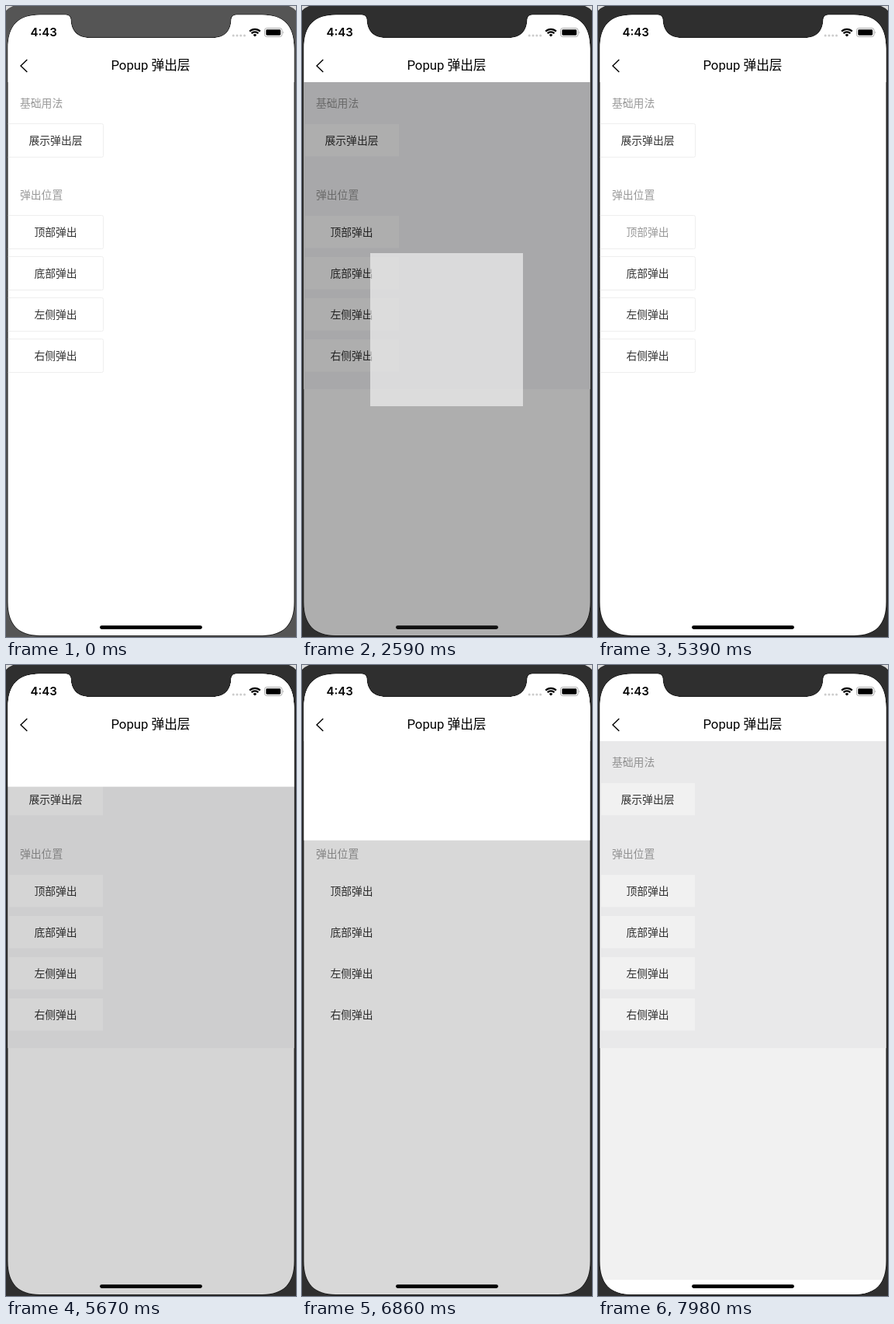
Animation, 374 px wide and 812 px high, one loop 8 s. Source, as an HTML page:

```html
<!DOCTYPE html>
<html lang="zh-CN">
<head>
<meta charset="utf-8">
<title>Popup</title>
<style>
  html, body { margin: 0; width: 100%; height: 100%; overflow: hidden; background: #fff; }
  svg { display: block; width: 374px; height: 812px; }
  text { font-family: Roboto, "Noto Sans CJK SC", "Noto Sans CJK", sans-serif; }
  .section { font-size: 13.8px; fill: #999; }
  .label { font-size: 13.8px; text-anchor: middle; }
</style>
</head>
<body>
<svg viewBox="0 0 374 812">
  <defs>
    <path id="shape" d="M2.5 55C2.5 25 16 11.5 44 11.5H77q6 0 6.5 6c.5 15 9 23.5 24 23.5H267c15 0 23-8.5 23.5-23.5q.5-6 6.5-6H330C358 11.5 371.5 25 371.5 55V767C371.5 796 358 810 330 810H44C16 810 2.5 796 2.5 767Z"/>
    <clipPath id="screen"><use href="#shape"/></clipPath>
  </defs>

  <rect id="bezel" width="374" height="812"/>
  <path d="M0 0H9Q4 2 0 6ZM374 0H365Q370 2 374 6Z" fill="#ddd"/>
  <use href="#shape" fill="#fff" stroke="#111" stroke-width="1.6"/>

  <g clip-path="url(#screen)">
    <rect x="2" y="11" width="370" height="800" fill="#fff"/>
    <rect id="tint" x="2" y="98" width="370" height="395" fill="#f6f6f8"/>
    <g id="buttons"></g>
    <text class="section" x="18" y="130">基础用法</text>
    <text class="section" x="18" y="248">弹出位置</text>
    <rect id="overlay" x="2" y="98" width="370" height="713"/>
    <rect id="popup" fill="#fff"/>

    <rect x="2" y="11" width="370" height="87" fill="#fff"/>
    <path d="M27.3 69L19 77L27.3 85" fill="none" stroke="#000" stroke-width="1.4"/>
    <text x="186.5" y="82" font-size="16.7" text-anchor="middle">Popup 弹出层</text>
    <text x="31.5" y="39.3" font-size="15" font-weight="600" style="font-family:Inter,sans-serif">4:43</text>

    <path d="M293.2 38H308" stroke="#ccc" stroke-width="3" stroke-linecap="round" stroke-dasharray="0 4.8"/>
    <g fill="none" stroke="#000" stroke-width="2.2">
      <path d="M314.2 32.6a9.6 9.6 0 0 1 13.6 0M316.6 35.3a6.2 6.2 0 0 1 8.8 0"/>
      <path d="M321 39.6l-2.3-2.4a3.3 3.3 0 0 1 4.6 0z" fill="#000" stroke="none"/>
    </g>
    <rect x="333.5" y="28.5" width="22.5" height="11" rx="2.8" fill="none" stroke="#aaa"/>
    <rect x="335.3" y="30.3" width="18.9" height="7.4" rx="1.4"/>
    <path d="M357.2 32.3q1.8 1.7 0 3.4z" fill="#aaa"/>
    <rect id="home" x="121" y="797.2" width="132" height="4.8" rx="2.4"/>
  </g>
</svg>
<script>
const LOOP = 8000, STEP = 70, DURATION = 300, SIZE = 197, DIM = 0.55;
const $ = id => document.getElementById(id);
const set = (el, attrs) => { for (const k in attrs) el.setAttribute(k, attrs[k]); };

const buttonInfo = [
  { y: 151.5, label: '展示弹出层', press: 2240 },
  { y: 269.5, label: '顶部弹出', press: 5390 },
  { y: 322.5, label: '底部弹出', press: 7770 },
  { y: 375.5, label: '左侧弹出' },
  { y: 428.5, label: '右侧弹出' }
];
$('buttons').innerHTML = buttonInfo.map(({ y, label }) => `
  <rect class="face" x="4" y="${y + 0.5}" width="121" height="41.5" fill="#fff"/>
  <path class="border" d="M2.5 ${y}H123.5q2 0 2 2v39q0 2-2 2H2.5" fill="none" stroke="#eee"/>
  <text class="label" x="64" y="${y + 26.8}">${label}</text>`).join('');
const labels = document.querySelectorAll('.label');
const borders = document.querySelectorAll('.border');

const popups = [
  { open: 2375, end: 3780, place: p => ({ x: 88, y: 318, width: SIZE, height: SIZE, opacity: p }) },
  { open: 5525, close: 6700, end: 7000, place: p => ({ x: 2, y: 98 - SIZE * (1 - p), width: 370, height: SIZE, opacity: 1 }) },
  { open: 7903, end: LOOP, place: p => ({ x: 2, y: 810.5 - SIZE * p, width: 370, height: SIZE + 2, opacity: 1 }) }
];

// cubic-bezier(.42, 0, 1, 1), solved by bisection
function easeIn(t) {
  if (t <= 0 || t >= 1) return t <= 0 ? 0 : 1;
  let low = 0, high = 1, u;
  for (let i = 0; i < 24; i++) {
    u = (low + high) / 2;
    const x = 1.26 * u * (1 - u) ** 2 + 3 * u * u * (1 - u) + u ** 3;
    if (x < t) low = u; else high = u;
  }
  return 3 * u * u * (1 - u) + u ** 3;
}

function draw(t) {
  set($('bezel'), { fill: t < 2240 ? '#555' : '#2f2f2f' });
  buttonInfo.forEach(({ press }, i) =>
    set(labels[i], { fill: t >= press && t < press + STEP ? '#999' : '#333' }));

  const active = popups.find(p => t >= p.open && t < p.end);
  let shade = 0, shown = 0, tinted = false;
  if (active) {
    const leaving = (t - active.close) / DURATION;
    if (leaving > 0) {
      shown = 1 - easeIn(leaving);
      shade = easeIn(1 - leaving);
      tinted = leaving < 0.2;
    } else {
      shown = shade = easeIn((t - active.open) / DURATION);
      tinted = true;
    }
    set($('popup'), active.place(shown));
  }
  set($('popup'), { visibility: active ? 'visible' : 'hidden' });
  set($('overlay'), { opacity: DIM * shade });
  set($('tint'), { opacity: tinted ? 1 : 0 });
  borders.forEach(b => set(b, { opacity: active ? 0 : 1 }));
  const grey = Math.round(51 * shade ** 2);
  set($('home'), { fill: `rgb(${grey},${grey},${grey})` });
}

function tick() {
  draw(Math.floor(performance.now() % LOOP / STEP) * STEP);
  requestAnimationFrame(tick);
}
tick();
</script>
</body>
</html>
```
